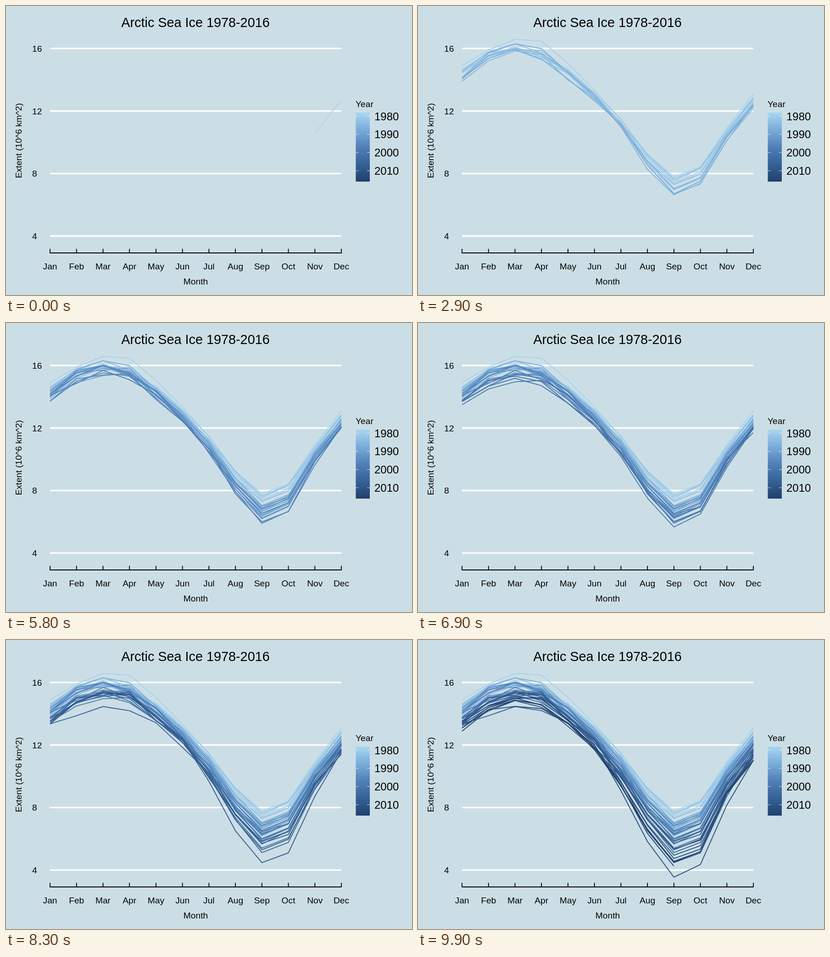
An HTML page for the animation above (10000 ms loop, 885 by 632 pixels).

```html
<!DOCTYPE html>
<html lang="en">
<head>
<meta charset="utf-8">
<title>Arctic Sea Ice 1978-2016</title>
<style>
  html, body { margin: 0; width: 100%; height: 100%; overflow: hidden; background: #ccdee5; }
  svg { display: block; width: 885px; height: 632px; font: 19.2px "Liberation Sans", Arial, sans-serif; }
  .title { font-size: 28.8px; }
  .mid { text-anchor: middle; }
  .key { font-size: 24px; }
  .grid { stroke: #fff; stroke-width: 3.2; }
  .axis { stroke: #000; stroke-width: 1.8; fill: none; }
  .notch { stroke: #fff; stroke-width: .8; }
  .year { fill: none; stroke-width: 1.9; stroke-linejoin: round; }
</style>
</head>
<body>
<svg viewBox="0 0 885 632">
  <defs><linearGradient id="scale" x1="0" y1="0" x2="0" y2="1"></linearGradient></defs>
  <text class="title mid" x="413" y="45.6">Arctic Sea Ice 1978-2016</text>
  <text class="mid" x="413.5" y="609">Month</text>
  <text class="mid" transform="translate(34 294.5) rotate(-90)">Extent (10^6 km^2)</text>
  <g id="frame"></g>
  <g id="lines"></g>
  <text x="762" y="220.5">Year</text>
  <rect x="762.5" y="233" width="30.5" height="151" fill="url(#scale)"/>
  <g id="keys"></g>
</svg>
<script>
const FIRST = 1978, LAST = 2016, LOOP = 10000;
const MONTHS = 'Jan Feb Mar Apr May Jun Jul Aug Sep Oct Nov Dec'.split(' ');
const SHADES = [[169, 214, 240], [122, 172, 218], [80, 128, 183], [53, 97, 150], [32, 64, 108]];

// Typical extent by month at both ends of the record
const EARLY = [14.4, 15.6, 16.05, 15.75, 14.5, 13, 11.4, 9, 7.4, 8.1, 10.6, 12.7];
const LATE = [13.1, 14.2, 14.75, 14.6, 13.2, 11.8, 9.4, 6.6, 4.6, 5.2, 8.8, 11];

// Departures of the record seasons
const WINTERS = { 1979: .6, 2006: -.7 };
const SUMMERS = { 1990: -.6, 2007: -1, 2012: -1.4 };

const $ = id => document.getElementById(id);
const xOf = month => 96 + month * 635 / 11;
const yOf = extent => 92.9 + (16 - extent) * 34.18;
const keyY = year => 233 + (year - FIRST) * 151 / (LAST - FIRST);

function add(parent, tag, attrs, text = '') {
  const el = document.createElementNS('http://www.w3.org/2000/svg', tag);
  for (const name in attrs) el.setAttribute(name, attrs[name]);
  el.textContent = text;
  return parent.appendChild(el);
}

function shade(year) {
  const pos = (year - FIRST) / (LAST - FIRST) * (SHADES.length - 1);
  const i = Math.min(Math.floor(pos), SHADES.length - 2);
  return `rgb(${SHADES[i].map((c, j) => Math.round(c + (SHADES[i + 1][j] - c) * (pos - i)))})`;
}

// Seeded value in -1..1, zero in the first year
const noise = (year, seed) => Math.sin(4e4 * Math.sin((year - FIRST) * (seed + 1.7)));

// 1 in the peak month, falling to 0 half a year away
const season = (month, peak) => .5 + .5 * Math.cos((month - peak) * Math.PI / 6);

function extent(year, month) {
  const t = ((year - FIRST) / (LAST - FIRST)) ** 1.3;
  const winter = season(month, 2) ** 2;
  const summer = season(month, 8.3) ** 3;
  return EARLY[month] + (LATE[month] - EARLY[month]) * t
    + winter * (WINTERS[year] ?? .3 * noise(year, 20))
    + summer * (SUMMERS[year] ?? .45 * noise(year, 30))
    + .22 * (1 - .7 * summer) * noise(year, month);
}

// Time at which a year appears; the pace quickens twice
function startOf(k) {
  if (k < 18) return Math.max(0, 300 * k - 100);
  return k < 24 ? 300 * k - 200 : 200 * k + 2100;
}

function addLine(year) {
  const from = year === FIRST ? 10 : year === LAST ? 1 : 0;
  const to = year === LAST ? 8 : 11;
  const points = [];
  for (let m = from; m <= to; m++) points.push(`${xOf(m).toFixed(1)},${yOf(extent(year, m)).toFixed(1)}`);
  return add($('lines'), 'polyline', { class: 'year', stroke: shade(year), points: points.join(' ') });
}

for (const v of [16, 12, 8, 4]) {
  add($('frame'), 'line', { class: 'grid', x1: 96, x2: 731, y1: yOf(v), y2: yOf(v) });
  add($('frame'), 'text', { x: 57, y: yOf(v) + 7 }, v);
}
add($('frame'), 'path', { class: 'axis', d: 'M95.2 540H731.8' });
MONTHS.forEach((name, m) => {
  add($('frame'), 'path', { class: 'axis', d: `M${xOf(m)} 540V531` });
  add($('frame'), 'text', { class: 'mid', x: xOf(m), y: 576 }, name);
});

SHADES.forEach((c, i) => add($('scale'), 'stop', { offset: i / (SHADES.length - 1), 'stop-color': `rgb(${c})` }));
for (let year = 1980; year <= 2010; year += 10) {
  const y = keyY(year);
  add($('keys'), 'path', { class: 'notch', d: `M762.5 ${y}h6M787 ${y}h6` });
  add($('keys'), 'text', { class: 'key', x: 803, y: y + 8.7 }, year);
}

const lines = [];
for (let year = FIRST; year <= LAST; year++) lines.push(addLine(year));

const begin = performance.now();
function tick() {
  const t = (performance.now() - begin) % LOOP;
  lines.forEach((line, k) => line.setAttribute('visibility', t >= startOf(k) ? 'visible' : 'hidden'));
  requestAnimationFrame(tick);
}
tick();
</script>
</body>
</html>
```
